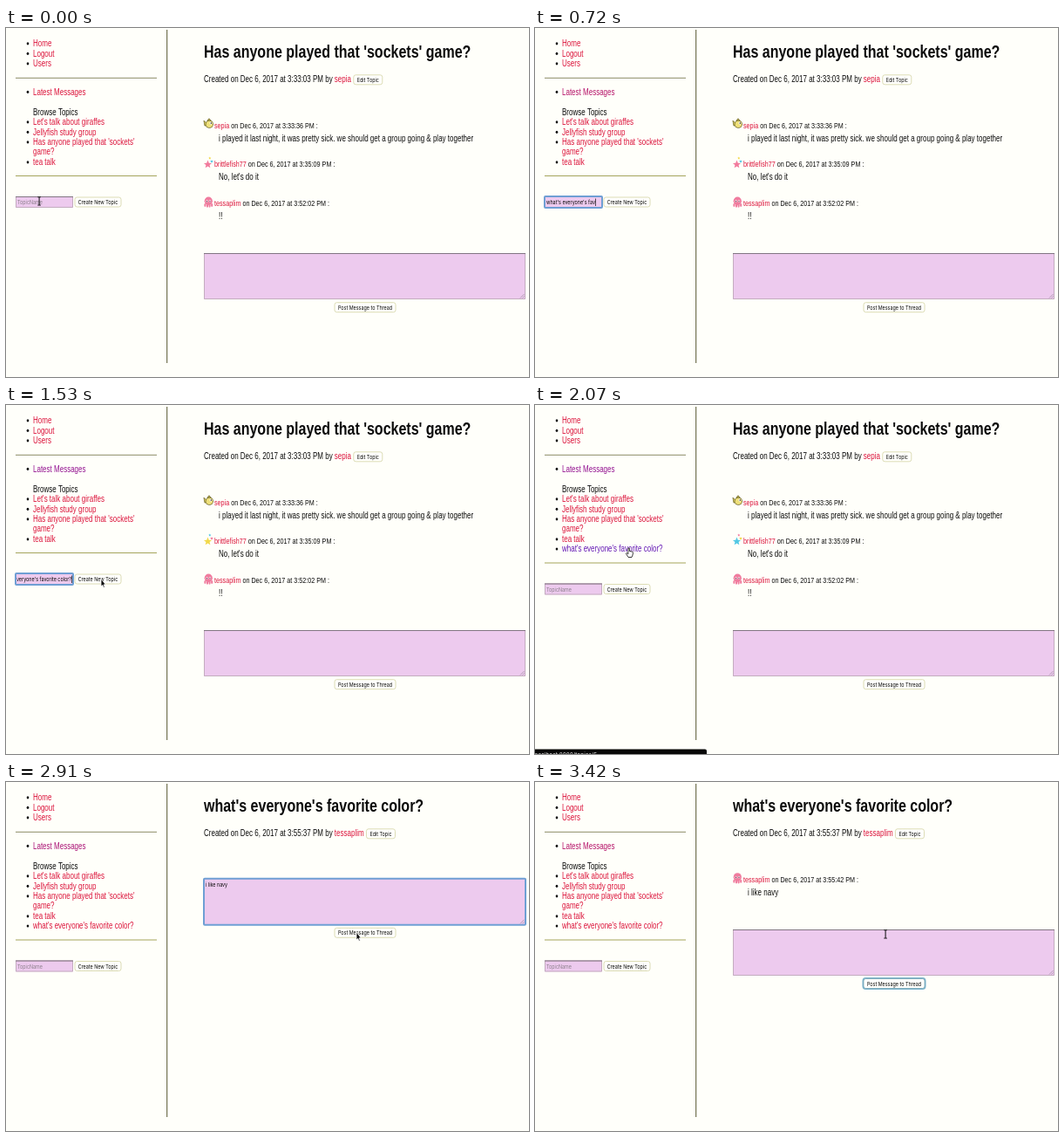
An HTML page with a canvas for the animation above (3.45 s loop, 600 px wide and 400 px high).

```html
<!DOCTYPE html>
<html lang="en">
<head>
<meta charset="utf-8">
<title>Message board</title>
<style>
html, body { margin: 0; width: 100%; height: 100%; overflow: hidden; background: #fffffa; }
canvas { display: block; width: 600px; height: 400px; }
</style>
</head>
<body>
<canvas id="stage" width="600" height="400"></canvas>
<script>
const ctx = document.getElementById('stage').getContext('2d');
const LOOP = 3450, STEP = 30;
const PAGE_X = 0.5, PAGE_Y = 0.625; // a 1200 x 640 page shown on a 600 x 400 stage
const SANS = '"Liberation Sans", Arial, sans-serif';
const UI = 'Inter, Roboto, sans-serif';
const INK = '#0c0c0c', RED = '#dc143c', PAPER = '#fffffa', LILAC = '#edcaee';

const OLD_TITLE = "Has anyone played that 'sockets' game?";
const NEW_TITLE = "what's everyone's favorite color?";
const REPLY = 'i like navy';
const ME = 'tessaplim';

const AT = {
  focusTopic: 90, created: 1680, hover: 1920,
  opened: 2220, focusReply: 2430, posted: 3090
};

// Pointer shapes and paths: [shape, start, end, x0, y0, x1, y1]
const POINTER = [
  ['beam', 0, 90, 38, 198, 38, 198],
  ['beam', 1140, 1230, 40, 200, 72, 201],
  ['arrow', 1230, 1410, 72, 201, 109, 199],
  ['arrow', 1410, 1770, 109, 199, 109, 199],
  ['arrow', 1770, 1920, 109, 199, 107, 170],
  ['hand', 1920, 2070, 107, 170, 108, 164],
  ['hand', 2070, 2220, 108, 164, 108, 164],
  ['arrow', 2220, 2340, 108, 164, 260, 138],
  ['beam', 2340, 2430, 260, 138, 300, 133],
  ['beam', 2790, 2850, 345, 142, 385, 160],
  ['arrow', 2850, 2910, 385, 160, 402, 172],
  ['arrow', 2910, 3090, 402, 172, 402, 172],
  ['beam', 3090, 3450, 402, 174, 402, 174]
];

function text(str, x, y, { size = 16, color = INK, font = SANS, weight = 400, align = 'left' } = {}) {
  ctx.save();
  ctx.translate(x, y);
  ctx.scale(PAGE_X, PAGE_Y);
  ctx.font = `${weight} ${size}px ${font}`;
  ctx.textAlign = align;
  ctx.fillStyle = color;
  ctx.fillText(str, 0, 0);
  const width = ctx.measureText(str).width * PAGE_X;
  ctx.restore();
  return x + width;
}

const ui = (str, x, y, options) => text(str, x, y, { size: 10.8, font: UI, ...options });

function rect(x, y, w, h, color) {
  ctx.fillStyle = color;
  ctx.fillRect(x, y, w, h);
}

function frame(x, y, w, h, radius, color, width) {
  ctx.beginPath();
  ctx.roundRect(x, y, w, h, radius);
  ctx.strokeStyle = color;
  ctx.lineWidth = width;
  ctx.stroke();
}

function shape(points, fill, stroke, width = 0.8) {
  ctx.beginPath();
  points.forEach(([x, y]) => ctx.lineTo(x, y));
  ctx.closePath();
  ctx.fillStyle = fill;
  ctx.fill();
  if (stroke) {
    ctx.strokeStyle = stroke;
    ctx.lineWidth = width;
    ctx.stroke();
  }
}

function oval(x, y, rx, ry, color) {
  ctx.beginPath();
  ctx.ellipse(x, y, rx, ry, 0, 0, Math.PI * 2);
  ctx.fillStyle = color;
  ctx.fill();
}

function button(label, x, y, w, focused) {
  if (focused) frame(x - 0.5, y - 0.5, w + 1, 12, 3, '#79b2cc', 2);
  ctx.beginPath();
  ctx.roundRect(x, y, w, 11, 2.5);
  ctx.fillStyle = '#fffffc';
  ctx.fill();
  frame(x, y, w, 11, 2.5, focused ? '#7aa6b4' : '#d3d3a4', 0.8);
  ui(label, x + w / 2, y + 8, { align: 'center' });
}

function field(x, y, w, h, focused) {
  rect(x, y, w, h, LILAC);
  if (focused) {
    frame(x, y, w, h, 1, '#6f9fd4', 2);
  } else {
    frame(x + 0.5, y + 0.5, w - 1, h - 1, 0, '#b9a5b4', 0.8);
    rect(x, y, w, 1, '#827582');
  }
}

function textarea(y, focused) {
  field(227, y, 369, 53, focused);
  ctx.beginPath();
  for (const d of [2, 4.5]) {
    ctx.moveTo(594.5 - d, y + 51.5);
    ctx.lineTo(594.5, y + 51.5 - d);
  }
  ctx.strokeStyle = '#8d7d8d';
  ctx.lineWidth = 0.6;
  ctx.stroke();
}

function topicInput(t, y) {
  const focused = t >= AT.focusTopic && t < AT.created;
  const typed = NEW_TITLE.slice(0, Math.max(0, Math.floor((t - AT.focusTopic) / STEP)));
  field(11, y, 66, 13, focused);
  if (!focused) {
    ui('TopicName', 13, y + 9.2, { color: '#8d808d' });
    return;
  }
  ctx.save();
  ctx.beginPath();
  ctx.rect(12.5, y, 63.5, 13);
  ctx.clip();
  ctx.font = `10.8px ${UI}`;
  const width = ctx.measureText(typed).width * PAGE_X;
  const end = ui(typed, Math.min(13, 75 - width), y + 9.2);
  rect(end + 0.2, y + 2.5, 0.7, 8.5, INK);
  ctx.restore();
}

function item(label, y, color = RED) {
  oval(25, y - 3.2, 1.3, 1.6, INK);
  text(label, 31, y, { color });
}

function sidebar(t) {
  const created = t >= AT.created;
  const shift = created ? 11.5 : 0;
  const glow = (1 - Math.cos(t / 900 * Math.PI * 2)) / 2;
  const latest = `rgb(${220 - 110 * glow}, 20, ${60 + 130 * glow})`;
  ['Home', 'Logout', 'Users'].forEach((label, i) => item(label, 21 + i * 11.5));
  rect(11, 56.8, 162, 1, '#8c8c66');
  item('Latest Messages', 76.5, latest);
  text('Browse Topics', 31, 99.5);
  item("Let's talk about giraffes", 111);
  item('Jellyfish study group', 122.5);
  item("Has anyone played that 'sockets'", 134);
  text('game?', 31, 145.3, { color: RED });
  item('tea talk', 157);
  if (created) item(NEW_TITLE, 168.2, t >= AT.hover && t < AT.opened ? '#6418b4' : RED);
  rect(11, 169 + shift, 162, 1, '#a5a55c');
  topicInput(t, 193 + shift);
  button('Create New Topic', 79, 194 + shift, 53);
  rect(184, 2, 1.3, 382, '#7c7c5c');
}

function fish(x, y) {
  const outline = '#6d6528';
  shape([[x + 4, y + 6], [x, y + 2], [x + 1, y + 8]], '#e6d862', outline);
  shape([[x + 4, y + 2], [x + 6, y - 0.5], [x + 8, y + 2]], '#e6d862', outline);
  oval(x + 6.3, y + 6, 4.6, 4.6, outline);
  oval(x + 6.3, y + 6, 3.8, 3.8, '#eee07a');
  oval(x + 8, y + 4.8, 1.4, 1.5, '#fff');
  oval(x + 8.3, y + 4.9, 0.7, 0.8, INK);
}

function star(x, y, r, color) {
  const points = Array.from({ length: 10 }, (_, i) => {
    const angle = i * Math.PI / 5 - Math.PI / 2, reach = i % 2 ? r * 0.45 : r;
    return [x + Math.cos(angle) * reach, y + Math.sin(angle) * reach];
  });
  shape(points, color);
}

function stars(x, y, t) {
  const colors = ['#f27a9c', '#f2d94a', '#52c8e4'];
  const k = Math.floor(t / 800);
  star(x + 4.5, y + 7.5, 4.8, colors[k % 3]);
  star(x + 9, y + 4, 2, colors[(k + 2) % 3]);
  star(x + 6.8, y + 0.3, 1.6, colors[(k + 1) % 3]);
}

function octopus(x, y) {
  const pink = '#f07c9e';
  oval(x + 5.3, y + 4.8, 4.6, 4.8, pink);
  for (let i = 0; i < 4; i++) {
    oval(x + 1.4 + i * 2.6, y + 9.5 + (i % 3 ? 0.7 : 0), 1.1, 2, pink);
  }
  for (const dx of [3.6, 7]) {
    oval(x + dx, y + 5, 1.1, 1.3, '#fff');
    oval(x + dx, y + 5.2, 0.6, 0.8, '#5a2340');
  }
}

function message(icon, user, time, body, y, t) {
  icon(227, y - 10.5, t);
  const end = text(user, 239, y, { size: 14.4, color: RED });
  text(` on Dec 6, 2017 at ${time} PM :`, end, y, { size: 14.4 });
  text(body, 244, y + 15);
}

function heading(title, time, user) {
  text(title, 227, 34, { size: 32, weight: 700 });
  let x = text(`Created on Dec 6, 2017 at ${time} PM by `, 227, 62);
  x = text(user, x, 62, { color: RED });
  button('Edit Topic', x + 2.8, 53.8, 33);
}

function oldThread(t) {
  heading(OLD_TITLE, '3:33:03', 'sepia');
  message(fish, 'sepia', '3:33:36',
    'i played it last night, it was pretty sick. we should get a group going & play together', 114.7, t);
  message(stars, 'brittlefish77', '3:35:09', "No, let's do it", 159.4, t);
  message(octopus, ME, '3:52:02', '!!', 204, t);
  textarea(258, false);
  button('Post Message to Thread', 377, 314.7, 70);
}

function newThread(t) {
  const posted = t >= AT.posted;
  const y = posted ? 169 : 110.8;
  const focused = t >= AT.focusReply && !posted;
  heading(NEW_TITLE, '3:55:37', ME);
  if (posted) message(octopus, ME, '3:55:42', REPLY, 114.7, t);
  textarea(y, focused);
  if (focused) {
    const typed = REPLY.slice(0, Math.floor((t - AT.focusReply) / STEP));
    const end = ui(typed, 229, y + 9);
    if (t < 2790) rect(end + 0.2, y + 2.5, 0.7, 8, INK);
  }
  button('Post Message to Thread', 377, y + 56.5, 70, posted);
}

function statusBar() {
  ctx.beginPath();
  ctx.roundRect(-4, 394.5, 201, 12, 2);
  ctx.fillStyle = '#080808';
  ctx.fill();
  text('localhost:8080/topics/5', -2, 403.5, { size: 13, font: UI, color: '#ddd' });
}

const pointerShapes = {
  beam() {
    rect(-0.4, -4, 1, 9, INK);
    rect(-1.7, -4.7, 3.6, 0.9, INK);
    rect(-1.7, 4.6, 3.6, 0.9, INK);
  },
  arrow() {
    shape([[0, 0], [0, 9], [1.7, 7.4], [3, 10.3], [4.3, 9.6], [3, 6.9], [5.2, 6.7]], INK, '#fff');
  },
  hand() {
    shape([[-1, 0], [0.3, 0], [0.5, 3.5], [3.5, 4], [4.5, 5.2], [4, 8], [3, 10.5],
      [-1, 10.5], [-3.6, 6.2], [-2.8, 5.4], [-1.2, 6.8]], '#fff', INK);
  }
};

function pointer(t) {
  const move = POINTER.find(([, start, end]) => t >= start && t < end);
  if (!move) return;
  const [kind, start, end, x0, y0, x1, y1] = move;
  const p = (t - start) / (end - start);
  const ease = p * (2 - p);
  ctx.save();
  ctx.translate(x0 + (x1 - x0) * ease, y0 + (y1 - y0) * ease);
  pointerShapes[kind]();
  ctx.restore();
}

function draw() {
  const t = Math.floor(performance.now() % LOOP / STEP) * STEP;
  rect(0, 0, 600, 400, PAPER);
  sidebar(t);
  if (t < AT.opened) oldThread(t);
  else newThread(t);
  if (t >= AT.hover && t < AT.opened) statusBar();
  pointer(t);
  requestAnimationFrame(draw);
}

draw();
</script>
</body>
</html>
```
